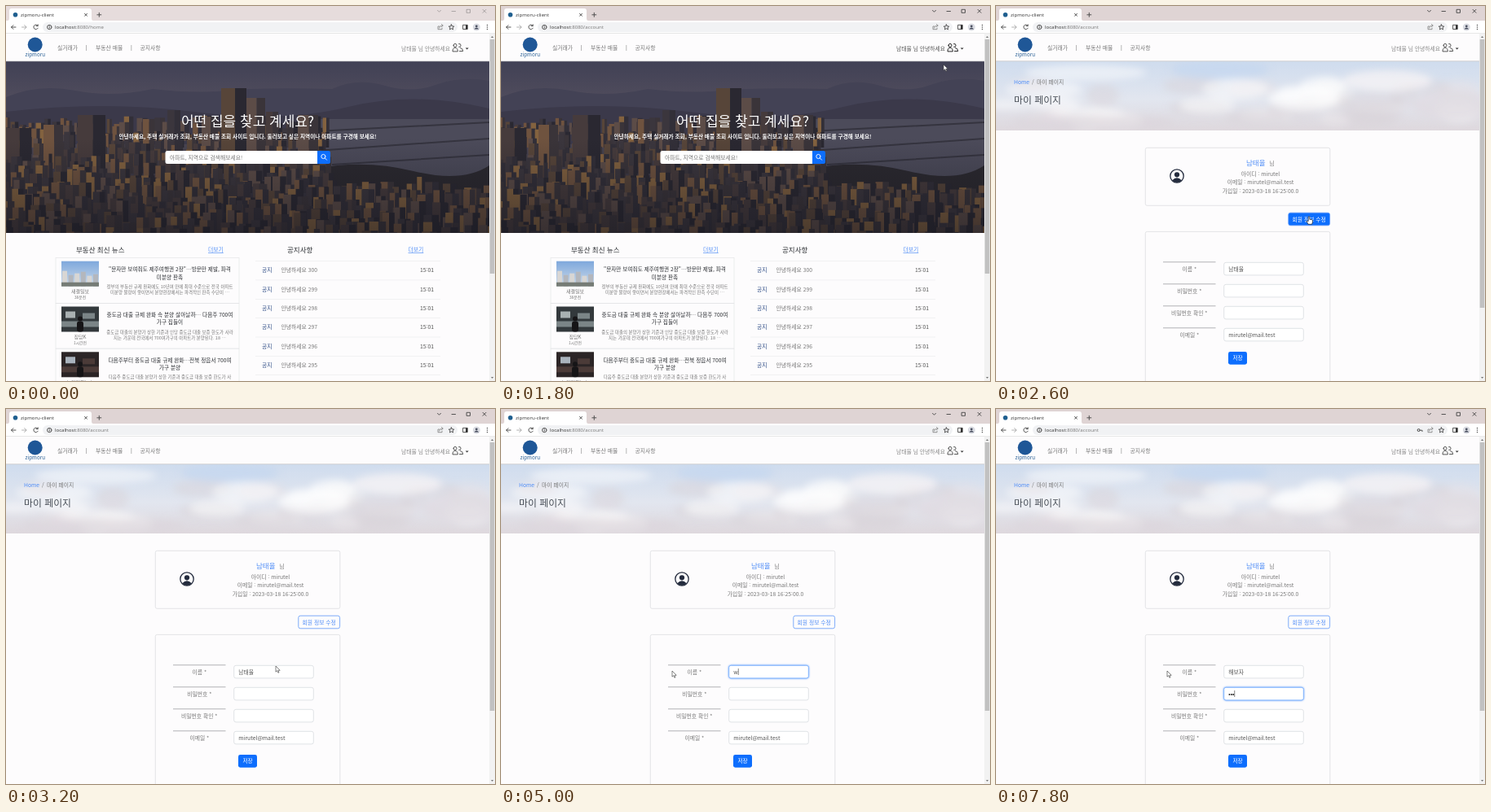
An HTML page for the animation above (8 s loop, 600 by 461 pixels).

```html
<!DOCTYPE html>
<html lang="ko">
<head>
<meta charset="utf-8">
<title>zipmoru-client</title>
<style>
html, body { margin: 0; height: 100%; overflow: hidden; background: #fdfcfd; }
svg { display: block; width: 100vw; height: 100vh; }
text { font: 6.8px "Noto Sans CJK KR", "Noto Sans CJK", sans-serif; fill: #777; white-space: pre; }
.ui { font-family: "Open Sans", sans-serif; font-size: 6.1px; fill: #333; }
.mid { text-anchor: middle; }
.dark { fill: #292c30; }
.white { fill: #fff; }
.bold { font-weight: 700; font-size: 6.65px; }
.medium { font-weight: 500; font-size: 6.65px; }
.h1 { font-size: 17px; }
.h2 { font-size: 11.9px; fill: #4a5058; }
.h3 { font-size: 8.5px; }
.small { font-size: 5.44px; }
.tiny { font-size: 4.8px; }
.link { fill: #4f8df7; }
.under { text-decoration: underline; }
.notice { fill: #2f4d86; font-weight: 500; }
.line { fill: none; stroke: #444; stroke-width: .9; stroke-linecap: round; stroke-linejoin: round; }
</style>
</head>
<body>
<svg id="stage" viewBox="0 0 600 461"></svg>
<script>
const LOOP = 8000, STEP = 200;
const PERSON = '남태율', USER = 'mirutel', MAIL = 'mirutel@mail.test';

let seed = 11;
const rnd = () => (seed = seed * 16807 % 2147483647) / 2147483647;
const pick = list => list[Math.floor(rnd() * list.length)];

const rect = (x, y, w, h, fill, more = '') =>
  `<rect x="${x}" y="${y}" width="${w}" height="${h}" fill="${fill}" ${more}/>`;
const circle = (x, y, r, fill, more = '') => `<circle cx="${x}" cy="${y}" r="${r}" fill="${fill}" ${more}/>`;
const text = (x, y, str, cls = '', more = '') => `<text x="${x}" y="${y}" class="${cls}" ${more}>${str}</text>`;
const line = (d, more = '') => `<path class="line" d="${d}" ${more}/>`;
const shape = (d, fill, more = '') => `<path d="${d}" fill="${fill}" ${more}/>`;
const group = (id, body, more = '') => `<g id="${id}" ${more}>${body}</g>`;
const person = (x, y, r, color) => circle(x, y, r, 'none', `stroke="${color}" stroke-width="${r * .16}"`) +
  circle(x, y - r * .2, r * .38, color) +
  shape(`M${x - r * .7} ${y + r * .65}Q${x} ${y - r * .1} ${x + r * .7} ${y + r * .65}Q${x} ${y + r * 1.3} ${x - r * .7} ${y + r * .65}`, color);

const defs = `<defs>
  <linearGradient id="dusk" x2="0" y2="1"><stop stop-color="#414155"/><stop offset=".3" stop-color="#55505f"/><stop offset="1" stop-color="#28262e"/></linearGradient>
  <linearGradient id="shade" x2="0" y2="1"><stop offset=".45" stop-color="#14141c" stop-opacity="0"/><stop offset="1" stop-color="#14141c" stop-opacity=".5"/></linearGradient>
  <linearGradient id="day" x2="0" y2="1"><stop stop-color="#cfdcee"/><stop offset=".55" stop-color="#e2e6ef"/><stop offset="1" stop-color="#ded8dd"/></linearGradient>
  <linearGradient id="blue" x2="0" y2="1"><stop stop-color="#7ea8dc"/><stop offset="1" stop-color="#cfdcea"/></linearGradient>
  <filter id="soft" x="-50%" y="-50%" width="200%" height="200%"><feGaussianBlur stdDeviation="5"/></filter>
  <clipPath id="cityBox"><rect y="68" width="593" height="211"/></clipPath>
  <clipPath id="skyBox"><rect y="68" width="593" height="85"/></clipPath>
</defs>`;

function browser() {
  return rect(0, 0, 600, 18, '#dfd4d4', 'id="strip"') + shape('M2 18Q4 18 4 15V6Q4 3 7 3H102Q105 3 105 6V15Q105 18 107 18Z', '#fff') +
    circle(11.5, 10.8, 2.8, '#1f5f8f') + text(18, 13, 'zipmoru-client', 'ui') +
    line('M96.5 9.3l3 3m0-3l-3 3M114.3 8.3v5m-2.5-2.5h5') +
    line('M529.5 5.3l2 2 2-2M547 6.5h4.5M565.5 4.3h4v4h-4zM585 4.3l4 4m0-4l-4 4', 'id="controls" stroke-width=".7"') +
    rect(0, 18, 600, 15.5, '#fff') + rect(45, 20, 509, 12, '#f1f2f4', 'rx="6"') +
    line('M12 26H6.5m2.4-2.4L6.5 26l2.4 2.4M39 24.2a2.8 2.8 0 1 0 .2 3M39.2 22.8v1.8h-1.8') +
    line('M19.5 26H25m-2.4-2.4L25 26l-2.4 2.4', 'style="stroke:#aaa"') +
    line('M56 26a2.7 2.7 0 1 0-5.4 0a2.7 2.7 0 1 0 5.4 0M53.3 25.8v1.4M53.3 24.5v.1', 'stroke-width=".7"') +
    `<text x="60" y="28.2" class="ui">localhost<tspan fill="#777">:8080/<tspan id="route"></tspan></tspan></text>` +
    line('M532 25h-2v3.7h5V27M531.7 27q.3-3 4.3-3m-1.5-1.6l1.6 1.6-1.6 1.6', 'style="stroke:#888"') +
    line('M546.5 22.8l1 2.1 2.3.2-1.8 1.5.6 2.3-2.1-1.2-2.1 1.2.6-2.3-1.8-1.5 2.3-.2z', 'stroke-width=".7"') +
    line('M561 23.3h5.2v5.2H561z') + rect(564, 23.3, 2.3, 5.2, '#333') +
    circle(577.3, 26, 4.5, '#dadce2') + circle(577.3, 24.8, 1.4, '#454b5c') + shape('M574.5 28.6q2.8-4 5.6 0z', '#454b5c') +
    [23.5, 26, 28.5].map(y => circle(590.5, y, .7, '#444')).join('') +
    group('key', line('M520 26.2h3v1.3') + circle(518.6, 26, 1.5, 'none', 'stroke="#444" stroke-width="1"')) +
    rect(0, 33, 600, .7, '#ddd');
}

function navbar() {
  const bar = x => rect(x, 48, .7, 7, '#999');
  return rect(0, 33.6, 593, 34.4, '#fdfcfd') + rect(0, 67.4, 593, .8, '#c8c8c8') +
    circle(35.7, 47.5, 9, '#1f5797') + text(35.7, 62.3, 'zipmoru', 'mid', 'style="font-size:6.3px;fill:#2c6297"') +
    text(63, 53.6, '실거래가') + bar(98.3) + text(110, 53.6, '부동산 매물') + bar(153.5) + text(164.6, 53.6, '공지사항') +
    text(485, 55.4, PERSON + ' 님 안녕하세요', '', 'id="hello"') +
    line('M548 55.5q0-4 3-4.3q3.3.3 3.3 4.3zM549 48.4a2 2 0 1 0 4 0a2 2 0 1 0-4 0M555.6 46.5a2 2 0 1 1 .1 3.9M556.5 55.5h4.2q0-3.6-3.2-4', 'id="people" stroke-width="1"') +
    shape('M563.7 51.4h4l-2 2.1z', '#333');
}

function scrollbar() {
  return rect(593, 33.6, 7, 427.4, '#f2f2f2') + shape('M595 39l1.6-2 1.6 2zM595 456l1.6 2 1.6-2z', '#777') +
    rect(593.7, 41, 5.6, 288, '#c1c1c1', 'id="thumb"');
}

function city() {
  // x, top, width, base
  const blocks = [[264, 101, 31, 206], [295, 113, 23, 206], [198, 128, 16, 187], [88, 134, 34, 205], [240, 136, 20, 190],
    [168, 139, 14, 190], [319, 130, 15, 190], [358, 134, 25, 212], [0, 150, 30, 205], [46, 146, 24, 200]];
  for (let base = 158; base < 305; base += 8) {
    const near = (base - 158) / 140;
    for (let x = -8; x < 593;) {
      const w = 6 + near * 8 + rnd() * 7;
      if (x < 390 || base > 232) blocks.push([x, base - 9 - near * 10 - rnd() * 14, w, base]);
      x += w * (.85 + rnd() * .7);
    }
  }
  blocks.sort((a, b) => a[3] - b[3]);
  const draw = ([x, top, w, base]) =>
    rect(x, top, w * .55, base - top, pick(['#6f533f', '#574539', '#83623f', '#463b3c', '#5c4c47', '#3b363d'])) +
    rect(x + w * .55, top, w * .45, base - top, pick(['#2a2831', '#322f38', '#3a3439']));
  return `<g clip-path="url(#cityBox)">` + rect(0, 68, 593, 211, 'url(#dusk)') +
    shape('M0 112Q40 95 85 104T180 102Q230 108 270 104T400 102Q430 88 465 98T530 96Q560 86 593 92V145H0Z', '#434255') +
    shape('M0 130Q120 116 230 130T420 124T593 126V170H0Z', '#3b394a') +
    rect(380, 139, 213, 70, '#4c4b5a') + shape('M380 154L593 143M380 178L593 163M400 195L593 183', 'none', 'stroke="#35343f" stroke-width="2"') +
    shape('M380 200Q440 188 500 203T593 196V279H380Z', '#2b292f') +
    blocks.map(draw).join('') + rect(0, 68, 593, 211, 'url(#shade)') + '</g>';
}

function thumbnail(y, kind) {
  if (!kind) return rect(68, y, 46, 31, 'url(#blue)') +
    [0, 1, 2, 3, 4, 5].map(i => rect(69 + i * 7.6, y + 12 + i * 5 % 7, 6, 19 - i * 5 % 7, i % 2 ? '#b4b7bd' : '#d8d6d4')).join('') +
    rect(68, y + 26, 46, 5, '#767c76');
  const [back, mid, light] = kind === 1 ? ['#33393c', '#7b8587', '#a9b1b2'] : ['#2b2526', '#4b3b38', '#a9b3bd'];
  return rect(68, y, 46, 31, back) + rect(68, y + 18, 46, 7, mid) + rect(73, y + 6, 12, 8, light) + rect(94, y + 8, 15, 7, mid) +
    circle(91, y + 15, 3, '#161517') + rect(87, y + 18, 8, 13, '#161517', 'rx="3"');
}

function newsRow(item, i) {
  const y = 309.5 + i * 55.8, [press, age, a, b, c, d] = item;
  return rect(61, y, 225, 55.8, 'none', 'stroke="#e2e3e5" stroke-width=".6"') + thumbnail(y + 4.2, i) +
    text(91, y + 43.5, press, 'mid', 'style="font-size:6px"') + text(91, y + 50.4, age, 'mid tiny') +
    text(201, y + 16.8, a, 'mid medium dark') + text(201, y + 26, b, 'mid medium dark') +
    text(201, y + 37.2, c, 'mid small') + text(201, y + 44.7, d, 'mid small');
}

function home() {
  const news = [
    ['새결일보', '38분전', '"문자만 보여줘도 제주여행권 2장"…방문만 제발, 파격', '미분양 판촉',
      '정부의 부동산 규제 완화에도 10년여 만에 최대 수준으로 전국 아파트', '미분양 물량이 쌓이면서 분양현장에서는 파격적인 판촉 수단이 …'],
    ['집담K', '1시간전', '중도금 대출 규제 완화 속 분양 살아날까… 다음주 700여', '가구 집들이',
      '중도금 대출의 분양가 상한 기준과 인당 중도금 대출 보증 한도가 사라', '지는 가운데 전국에서 700여가구의 아파트가 분양된다. 18 …'],
    ['누리터결뉴스', '1시간전', '다음주부터 중도금 대출 규제 완화…전북 정읍서 700여', '가구 분양',
      '다음주 중도금 대출 분양가 상한 기준과 중도금 대출 보증 한도가 사', '']];
  let notices = rect(306, 313.2, 227, .5, '#e4e5e7');
  for (let i = 0; i < 6; i++) {
    const y = 327.4 + i * 23.35;
    notices += text(314, y, '공지', 'notice') + text(337.5, y, '안녕하세요 ' + (300 - i)) +
      text(508, y, '15:01', '', 'style="fill:#555"') + rect(306, y + 9.3, 227, .5, '#e4e5e7');
  }
  return city() + text(296.5, 148, '어떤 집을 찾고 계세요?', 'mid h1 white') +
    text(296.5, 162.8, '안녕하세요, 주택 실거래가 조회, 부동산 매물 조회 사이트 입니다. 둘러보고 싶은 지역이나 아파트를 구경해 보세요!', 'mid bold white') +
    rect(195.5, 178, 190, 16, '#fff', 'rx="2.5"') + text(201, 188.6, '아파트, 지역으로 검색해보세요!') +
    rect(382, 178, 16, 16, '#0d6efd', 'rx="2.5"') + rect(382, 178, 5, 16, '#0d6efd') +
    line('M392 185a2.6 2.6 0 1 0-5.2 0a2.6 2.6 0 1 0 5.2 0M391.3 186.9l2.2 2.3', 'style="stroke:#fff"') +
    text(86, 303, '부동산 최신 뉴스', 'h3 dark') + text(248, 302, '더보기', 'link under') +
    text(345, 303, '공지사항', 'h3 dark') + text(493.5, 302, '더보기', 'link under') +
    news.map(newsRow).join('') + notices;
}

function sky() {
  let clouds = '';
  const puff = (x, y, rx, ry, fill, o) => `<ellipse cx="${x}" cy="${y}" rx="${rx}" ry="${ry}" fill="${fill}" opacity="${o}"/>`;
  for (let i = 0; i < 34; i++) {
    const x = rnd() * 600, y = 95 + rnd() * 58;
    clouds += puff(x, y, 15 + rnd() * 32, 5 + rnd() * 10, pick(['#fff', '#f6f3f4', '#d9d3da', '#e8e2e5']), .5);
  }
  clouds += puff(110, 82, 75, 10, '#f3f5f9', .7) + puff(275, 78, 60, 12, '#c6d7ef', .8) + puff(378, 114, 44, 15, '#fff', .65) +
    puff(400, 99, 28, 12, '#fff', .6) + puff(480, 92, 55, 13, '#f5f3f5', .8) + puff(120, 143, 100, 9, '#dad4da', .6) +
    puff(560, 122, 50, 18, '#e0dbe1', .8);
  return group('sky', rect(0, 68, 593, 85, 'url(#day)') + `<g filter="url(#soft)">${clouds}</g>`, 'clip-path="url(#skyBox)"');
}

function account() {
  const card = (y, h) => rect(183.3, y, 226.5, h, '#fdfcfd', 'rx="2" stroke="#dcdde0" stroke-width=".8"');
  const info = (y, s) => text(324.5, y, s, 'mid');
  const field = (i, label) => {
    const y = 315 + i * 27;
    return rect(205, y - .5, 64.5, .7, '#8f9296') + text(237.3, y + 11, label + ' *', 'mid') +
      rect(279.7, y + .3, 97.6, 15.6, '#fff', 'rx="2.4" stroke="#d3d7dc" stroke-width=".7"');
  };
  const form = card(277.4, 200) + ['이름', '비밀번호', '비밀번호 확인', '이메일'].map((s, i) => field(i, s)).join('') +
    rect(279.7, 315.3, 97.6, 15.6, '#fff', 'id="focus" rx="2.4" stroke="#86b7fe" stroke-width="1" style="filter:drop-shadow(0 0 1px #5a9bff)"') +
    rect(284.8, 317.3, 20, 11.4, '#1a75d9', 'id="selection"') +
    text(285.3, 326, '', '', 'id="name"') +
    text(285.3, 353, '', '', `id="password" style="fill:#222;font-family:'Liberation Sans',sans-serif"`) +
    text(285.3, 407, MAIL, '', 'style="fill:#555"') +
    rect(0, 0, .6, 8, '#333', 'id="caret"') +
    rect(285, 425, 23, 15.7, '#0d6efd', 'rx="2.4"') + text(296.5, 435.4, '저장', 'mid medium white');
  return sky() + text(22, 96, 'Home', 'link') + text(44, 96, '/') + text(50, 96, '마이 페이지') + text(22, 120, '마이 페이지', 'h2') +
    card(174.3, 71) + person(222, 209, 8.2, '#232b3d') +
    text(307, 196, PERSON, 'h3 link') + text(335.3, 196, '님') +
    info(209, '아이디 : ' + USER) + info(219.3, '이메일 : ' + MAIL) + info(229.6, '가입일 : 2023-03-18 16:25:00.0') +
    rect(358.8, 254.2, 50.8, 15.6, '#fdfcfd', 'id="edit" rx="2.4" stroke="#5f97f8" stroke-width=".8"') +
    text(384.2, 264.6, '회원 정보 수정', 'mid link', 'id="editLabel"') + group('form', form);
}

const menu = group('menu', rect(503.3, 61.7, 67, 33.6, '#fff', 'rx="2.2" stroke="#ccc" stroke-width=".7"') +
  rect(503.7, 66, 66.2, 12.5, '#e9ebee') + person(514.5, 72.2, 3.8, '#222') + text(520.3, 74.6, '마이 페이지', 'dark') +
  line('M513.5 84.4h-2.7v3.4h2.7M512.8 86.1h1.5M514.3 84.2h2l1.8 1.9-1.8 1.9h-2z', 'stroke-width=".7"') + text(520.3, 88.3, '로그아웃', 'dark'));
const cursor = group('cursor',
  shape('M0 0V7.2L1.7 5.7 2.9 8.3 4 7.8 2.9 5.3H5.2Z', '#fff', 'id="arrow" stroke="#333" stroke-width=".6"') +
  shape('M-.8 0Q0-1 .8 0V3.3Q3.8 3.2 4.4 4.5V7Q4 8 3.6 9.3H-1Q-1.7 7.5-3 5.6Q-2.4 4.5-.8 5.7Z', '#fff', 'id="hand" stroke="#222" stroke-width=".7"'));

const stage = document.getElementById('stage');
stage.innerHTML = defs + rect(0, 0, 600, 461, '#fdfcfd') + group('home', home()) + group('account', account()) +
  navbar() + browser() + scrollbar() + menu + cursor;

const el = {};
stage.querySelectorAll('[id]').forEach(node => el[node.id] = node);
const show = (id, on) => el[id].style.display = on ? '' : 'none';
const set = (id, attrs) => { for (const k in attrs) el[id].setAttribute(k, attrs[k]); };
const between = (t, a, b) => t >= a && t < b;

// time, x, y of the pointer tip
const path = [[200, 575, 190], [600, 553, 52], [1000, 532, 74], [1200, 532, 74], [1800, 543, 72], [2000, 432, 152.5],
  [2400, 384, 259], [2600, 384, 259], [3200, 331, 316], [3600, 322, 321], [4200, 210, 322], [LOOP, 210, 322]];
const typed = ['', 'ㅎ', '해', '해보', '해보ㅈ', '해보자'];

function pointer(t) {
  const i = Math.max(1, path.findIndex(p => p[0] >= t)), [a, b] = [path[i - 1], path[i]];
  const k = (t - a[0]) / (b[0] - a[0]);
  return [1, 2].map(n => a[n] + (b[n] - a[n]) * k);
}

function render(now) {
  const t = Math.floor(now / STEP) * STEP;
  const onAccount = t >= 2000, formOpen = t >= 2600, hover = between(t, 2400, 2800), greeted = between(t, 600, 2000);
  show('home', !onAccount);
  show('account', onAccount);
  show('form', formOpen);
  show('menu', between(t, 800, 1400));
  show('key', t >= 7400);
  el.route.textContent = t < 1400 ? 'home' : 'account';
  // the window gains focus with the first click
  el.controls.style.opacity = t < 600 ? .4 : 1;
  set('strip', { fill: t < 600 ? '#e6dcdc' : '#dfd4d4' });
  el.hello.style.fill = greeted ? '#555' : '#888';
  el.people.style.stroke = greeted ? '#111' : '#444';
  el.sky.style.opacity = t < 2200 ? .8 : 1;
  set('thumb', { height: formOpen ? 330 : onAccount ? 343 : 288 });
  set('edit', { fill: hover ? '#0d6efd' : '#fdfcfd' });
  el.editLabel.style.fill = hover ? '#fff' : '';

  const onPassword = t >= 6800, selected = between(t, 4000, 5000);
  el.name.textContent = t < 5000 ? PERSON : t < 5600 ? 'w' : typed[Math.min(5, (t - 5600) / STEP)];
  el.name.style.fill = selected ? '#fff' : '#555';
  el.password.textContent = '•'.repeat(Math.max(0, (t - 7200) / STEP));
  show('focus', t >= 3800);
  set('focus', { y: onPassword ? 342.3 : 315.3 });
  show('selection', selected);
  show('caret', t >= 3800 && !selected);
  const field = onPassword ? el.password : el.name;
  if (formOpen) set('caret', { x: 285.4 + field.getComputedTextLength(), y: onPassword ? 346 : 319 });

  show('cursor', t >= 200);
  const hand = between(t, 600, 1400) || hover;
  show('hand', hand);
  show('arrow', !hand);
  set('cursor', { transform: `translate(${pointer(Math.max(t, 200))})` });
}

(function tick() {
  render(performance.now() % LOOP);
  requestAnimationFrame(tick);
})();
</script>
</body>
</html>
```
